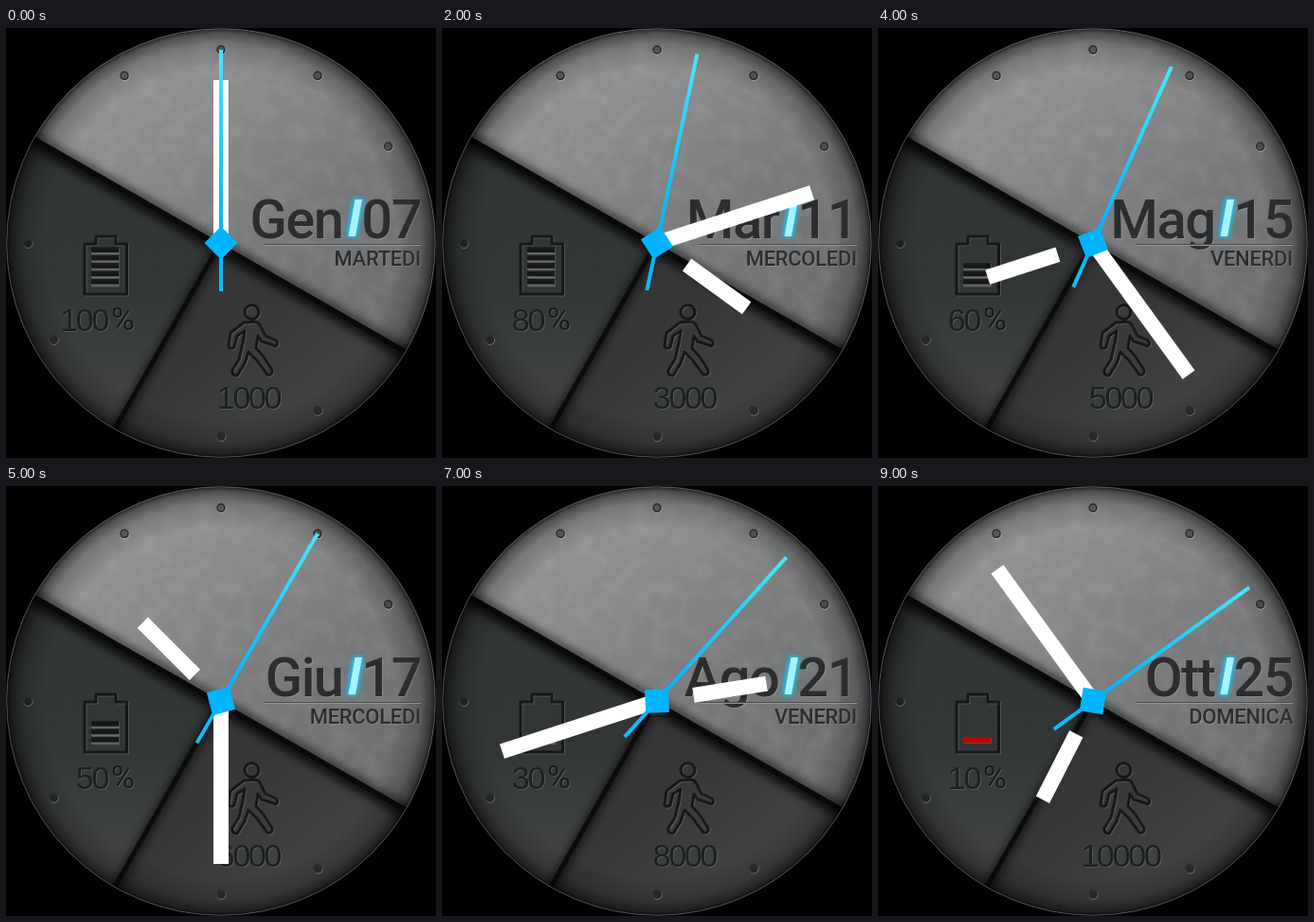
Animation, 454 px wide and 454 px high, one loop 10 s. Source, as an HTML page:

```html
<!DOCTYPE html>
<html lang="it">
<head>
<meta charset="utf-8">
<title>Watch face</title>
<style>
  html, body { margin: 0; width: 100%; height: 100%; overflow: hidden; background: #000; }
  svg { display: block; width: 100vw; height: 100vh; }
  text { font-family: Roboto, Arial, sans-serif; }
  .engraved { filter: drop-shadow(1px 1px 0 #ffffff26); }
  .date { fill: #2b2d2f; font-weight: 500; }
  .big { font-size: 58px; letter-spacing: -1.6px; }
  .weekday { font-size: 22px; letter-spacing: -.3px; }
  .count { font: 34px "Liberation Sans", Arial, sans-serif; letter-spacing: -2.3px; fill: #1c1f20; }
  .percent { font-size: 34px; fill: #17191a; }
  .icon { fill: none; stroke: #141617; stroke-width: 3; stroke-linejoin: round; }
</style>
</head>
<body>
<svg viewBox="0 0 454 454">
  <defs>
    <clipPath id="disc"><circle cx="227" cy="227" r="226"/></clipPath>
    <clipPath id="top"><path d="M0 0H454V357L0 97Z"/></clipPath>
    <linearGradient id="steel" x1=".1" y1=".1" x2=".9" y2="1">
      <stop offset="0" stop-color="#969797"/>
      <stop offset=".3" stop-color="#898b8c"/>
      <stop offset=".6" stop-color="#76787a"/>
      <stop offset="1" stop-color="#686a6c"/>
    </linearGradient>
    <linearGradient id="leftPane" x1="0" y1="0" x2="0" y2="1">
      <stop offset="0" stop-color="#323536"/>
      <stop offset=".5" stop-color="#333637"/>
      <stop offset=".8" stop-color="#414344"/>
      <stop offset="1" stop-color="#474849"/>
    </linearGradient>
    <linearGradient id="rightPane" x1="0" y1="0" x2="1" y2=".8">
      <stop offset="0" stop-color="#303233"/>
      <stop offset=".45" stop-color="#353738"/>
      <stop offset=".8" stop-color="#444546"/>
      <stop offset="1" stop-color="#393a3b"/>
    </linearGradient>
    <radialGradient id="rim" gradientUnits="userSpaceOnUse" cx="227" cy="227" r="226">
      <stop offset=".82" stop-color="#000" stop-opacity="0"/>
      <stop offset=".93" stop-color="#000" stop-opacity=".2"/>
      <stop offset=".98" stop-color="#000" stop-opacity=".48"/>
      <stop offset="1" stop-color="#000" stop-opacity=".75"/>
    </radialGradient>
    <linearGradient id="needle" gradientUnits="userSpaceOnUse" x1="0" y1="-204" x2="0" y2="51">
      <stop offset="0" stop-color="#45e8fb"/>
      <stop offset=".75" stop-color="#00b4ff"/>
      <stop offset="1" stop-color="#12bdf8"/>
    </linearGradient>
    <filter id="grain" x="0" y="0" width="100%" height="100%">
      <feTurbulence type="fractalNoise" baseFrequency=".05" numOctaves="5" seed="7"/>
      <feColorMatrix values="0 0 0 0 1  0 0 0 0 1  0 0 0 0 1  1.2 0 0 0 -.45"/>
    </filter>
    <filter id="soft" filterUnits="userSpaceOnUse" x="-20" y="-20" width="494" height="494">
      <feGaussianBlur stdDeviation="4"/>
    </filter>
    <filter id="glow" x="-100%" y="-30%" width="300%" height="160%">
      <feGaussianBlur stdDeviation="2.500"/>
    </filter>
  </defs>

  <rect width="454" height="454" fill="#000"/>
  <g clip-path="url(#disc)">
    <path d="M0 95L227 226L100 454H0Z" fill="url(#leftPane)"/>
    <path d="M227 226L454 357V454H100Z" fill="url(#rightPane)"/>
    <path d="M223 234L103 446" stroke="#000" stroke-width="12" opacity=".5" filter="url(#soft)"/>
    <path d="M223 233L103 444" stroke="#0b0c0c" stroke-width="5"/>
    <path d="M0 101L454 361" stroke="#000" stroke-width="18" opacity=".7" filter="url(#soft)"/>
    <path d="M0 99L454 359" stroke="#080909" stroke-width="8"/>
    <g clip-path="url(#top)">
      <rect width="454" height="360" fill="url(#steel)"/>
      <rect width="454" height="360" filter="url(#grain)" opacity=".13"/>
      <path d="M0 97L454 357" stroke="#000" stroke-width="9" opacity=".5" filter="url(#soft)"/>
    </g>
    <circle cx="227" cy="227" r="226" fill="url(#rim)"/>
  </g>
  <circle cx="227" cy="227" r="226.3" fill="none" stroke="#626465" stroke-width=".8"/>
  <g id="holes"></g>

  <g class="engraved">
    <path class="icon" d="M83 228H95V220H116V228H127.500V281H83Z"/>
    <g id="bars"></g>
    <text id="level" class="count" x="107" y="319.500" text-anchor="end"></text>
    <text class="percent" x="111" y="318.500">%</text>
    <circle class="icon" cx="259.500" cy="300" r="7.500"/>
    <path class="icon" d="M251 311L263 310Q268 311 270 317L274 325L285 330Q288 333 285 336L270 331L266 325L264 338L272 347L281 361Q282 367 276 366L265 351L256 342L252 354L244 367Q238 367 239 361L246 350L250 333L252 320L244 325L241 337Q237 340 235 336L237 322Z"/>
    <text id="steps" class="count" x="256" y="401.500" text-anchor="middle"></text>
  </g>

  <g class="engraved date">
    <text id="month" class="big" x="355.500" y="222" text-anchor="end"></text>
    <text id="day" class="big" x="438" y="222" text-anchor="end"></text>
    <text id="weekday" class="weekday" x="438" y="251.300" text-anchor="end"></text>
  </g>
  <path d="M272 228.500H438" stroke="#47494a"/>
  <path d="M272 229.500H438" stroke="#949697"/>
  <path d="M367.500 181H376.500L369.500 220H360.500Z" fill="#18c8ff" stroke="#18c8ff" stroke-width="2" filter="url(#glow)"/>
  <path d="M368.500 181H376L369 220H361.500Z" fill="#a5f3ff"/>

  <g transform="translate(227 227)">
    <rect id="hour" x="-8" y="-117" width="16" height="78" fill="#fff"/>
    <rect id="minute" x="-8" y="-172" width="16" height="166" fill="#fff"/>
    <g id="second">
      <rect x="-2" y="-204" width="4" height="255" fill="url(#needle)"/>
      <path d="M0 -17.500L17.500 0L0 17.500L-17.500 0Z" fill="#00b4ff"/>
    </g>
  </g>
</svg>
<script>
const byId = id => document.getElementById(id);
const setText = (id, value) => { byId(id).textContent = value; };
const rotate = (id, angle) => byId(id).setAttribute("transform", `rotate(${angle})`);

const months = ["Gen", "Feb", "Mar", "Apr", "Mag", "Giu", "Lug", "Ago", "Set", "Ott"];
const weekdays = ["MARTEDI", "LUNEDI", "MERCOLEDI", "LUNEDI", "VENERDI",
  "MERCOLEDI", "DOMENICA", "VENERDI", "MERCOLEDI", "DOMENICA"];
const barCounts = [5, 5, 5, 4, 3, 3, 2, 1, 1, 1];

byId("holes").innerHTML = [0, 1, 2, 5, 6, 8, 9, 11].map(hour => {
  const angle = hour * Math.PI / 6;
  const x = 227 + 204 * Math.sin(angle), y = 227 - 204 * Math.cos(angle);
  return `<circle cx="${x + .5}" cy="${y + .8}" r="4.600" fill="none" stroke="#fff" stroke-opacity=".3"/>
    <circle cx="${x}" cy="${y}" r="4" fill="#000" fill-opacity=".3" stroke="#242627" stroke-width="1.500"/>`;
}).join("");

function batteryBars(step) {
  const low = step === 9;
  let bars = "";
  for (let i = 0; i < barCounts[step]; i++) {
    const y = 265 - i * 8.4;
    bars += `<path d="M90 ${y}H119V${y + 6}H90Z" fill="${low ? "#c40000" : "#151718"}"/>`;
    if (!low) bars += `<path d="M90 ${y + 6.5}H119" stroke="#66696a" stroke-width="1.800"/>`;
  }
  return bars;
}

function show(step) {
  setText("month", months[step]);
  setText("day", String(7 + 2 * step).padStart(2, "0"));
  setText("weekday", weekdays[step]);
  setText("level", 100 - 10 * step);
  setText("steps", 1000 * (step + 1));
  byId("bars").innerHTML = batteryBars(step);
  rotate("hour", 63 * step);
  rotate("minute", 36 * step);
  rotate("second", 6 * step);
}

let shown = -1;
const start = performance.now();
function tick() {
  const step = Math.floor((performance.now() - start) / 1000) % 10;
  if (step !== shown) show(shown = step);
  requestAnimationFrame(tick);
}
tick();
</script>
</body>
</html>
```
